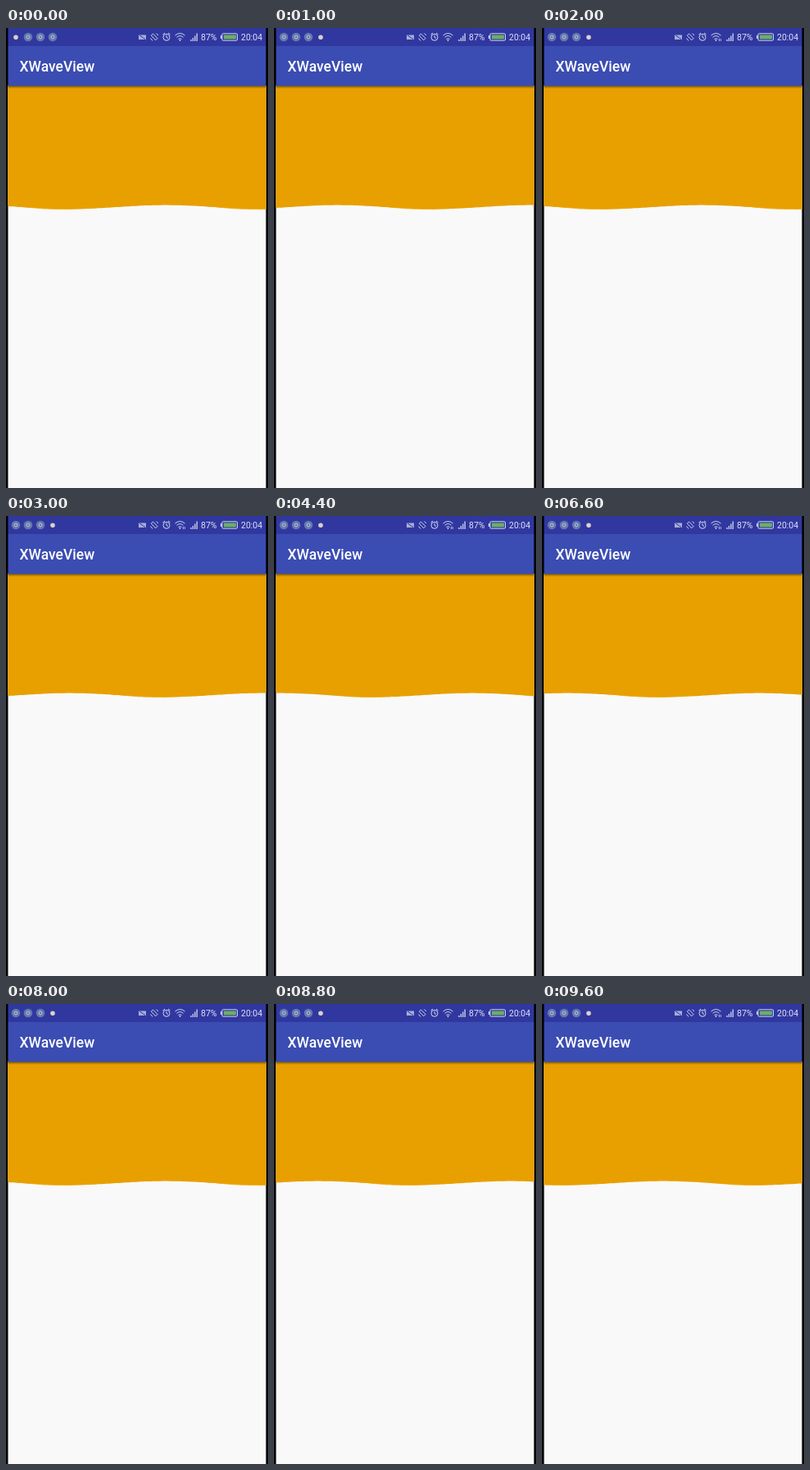
An HTML page for the animation above (9800 ms loop, 320 by 560 pixels).

```html
<!DOCTYPE html>
<html lang="en">
<head>
<meta charset="utf-8">
<title>XWaveView</title>
<style>
  html, body { margin: 0; width: 100%; height: 100%; overflow: hidden; background: #000; }
  svg { display: block; }
  text { font-family: Roboto, sans-serif; fill: #fff; }
  .status { font-size: 10.5px; fill: #dfe1f2; }
  .line { fill: none; stroke: #d3d6ee; stroke-width: 1; }
</style>
</head>
<body>
<svg width="320" height="560" viewBox="0 0 320 560">
  <defs>
    <linearGradient id="shade" x2="0" y2="1">
      <stop stop-color="#3a2a10" stop-opacity=".65"/>
      <stop offset="1" stop-color="#3a2a10" stop-opacity="0"/>
    </linearGradient>
    <g id="badge">
      <circle r="5.3" fill="#6678ad"/>
      <circle r="2" fill="none" stroke="#c3cce0" stroke-width=".9"/>
    </g>
  </defs>

  <path fill="#f9f9f9" d="M2.5 70H317.5V560H2.5z"/>
  <path id="back" fill="#f5b937"/>
  <path id="front" fill="#e8a000"/>
  <path fill="url(#shade)" d="M2.5 70H317.5V74H2.5z"/>
  <path fill="#3b4db2" d="M2.5 22H317.5V70.5H2.5z"/>
  <path fill="#3038a0" d="M2.5 0H317.5V22H2.5z"/>
  <text x="16.5" y="53" font-size="17.5" font-weight="500">XWaveView</text>

  <g id="badges">
    <use href="#badge"/><use href="#badge" x="15"/><use href="#badge" x="30"/>
  </g>
  <circle id="dot" cy="11.2" r="2.8" fill="#ddd0c4"/>

  <g class="line">
    <path fill="#a9afd6" stroke="none" d="M162 8.5H171V14H162z"/>
    <path stroke="#3038a0" d="M163 9L170 13.5"/>
    <path d="M179.5 7L185 12.5L182.8 14.8L177.3 9.2zM176.5 12.5L179 15.5M183.5 6.5L186 9"/>
    <circle cx="196" cy="11.3" r="4"/>
    <path d="M196 9V11.5L198 12.5M191.5 8L194 6M198 6L200.5 8"/>
    <path d="M206.5 9Q212.5 4 218.5 9M208.5 11.3Q212.5 7.8 216.5 11.3M210.5 13.5Q212.5 11.8 214.5 13.5"/>
    <circle cx="212.5" cy="15" r=".9" fill="#d3d6ee" stroke="none"/>
    <path id="traffic" d="M216.5 13V16M218.3 13V16" stroke-width=".8"/>
    <path stroke-width="1.3" d="M226 14V16M228.4 12V16M230.8 9.5V16M233.2 6.5V16"/>
    <rect x="264" y="6.8" width="18.5" height="8.4" rx="1.2"/>
    <path fill="#6cae62" stroke="none" d="M266 8.5H281V13.5H266z"/>
    <path stroke-width="1.6" d="M262.8 9V13"/>
  </g>
  <text class="status" x="238" y="15">87%</text>
  <text class="status" x="287" y="15">20:04</text>
</svg>
<script>
const LOOP = 9800, STEP = 200, LENGTH = 235, PERIOD = 2000;
const [back, front, badges, dot, traffic] =
  ['back', 'front', 'badges', 'dot', 'traffic'].map(id => document.getElementById(id));

// Filled area from the toolbar down to a cosine whose crest lies at x = crest.
function wave(crest, mean, height) {
  let d = 'M2.5 70';
  for (let x = 2.5; x <= 317.5; x += 3) {
    const y = mean - height * Math.cos((x - crest) / LENGTH * 2 * Math.PI);
    d += `L${x} ${y.toFixed(2)}`;
  }
  return d + 'V70z';
}

function draw(now) {
  const t = Math.floor(now % LOOP / STEP) * STEP;
  const crest = 195 + t / PERIOD * LENGTH;
  front.setAttribute('d', wave(crest, 218, 2.4));
  back.setAttribute('d', wave(crest - 9, 217, 4));

  const first = t < STEP;
  badges.setAttribute('transform', `translate(${first ? 27 : 12} 11)`);
  dot.setAttribute('cx', first ? 12 : 57);
  traffic.style.display = t >= 2000 && t < 7200 || t >= 9000 ? '' : 'none';
}

const start = performance.now();
function tick() {
  draw(performance.now() - start);
  requestAnimationFrame(tick);
}
tick();
</script>
</body>
</html>
```
